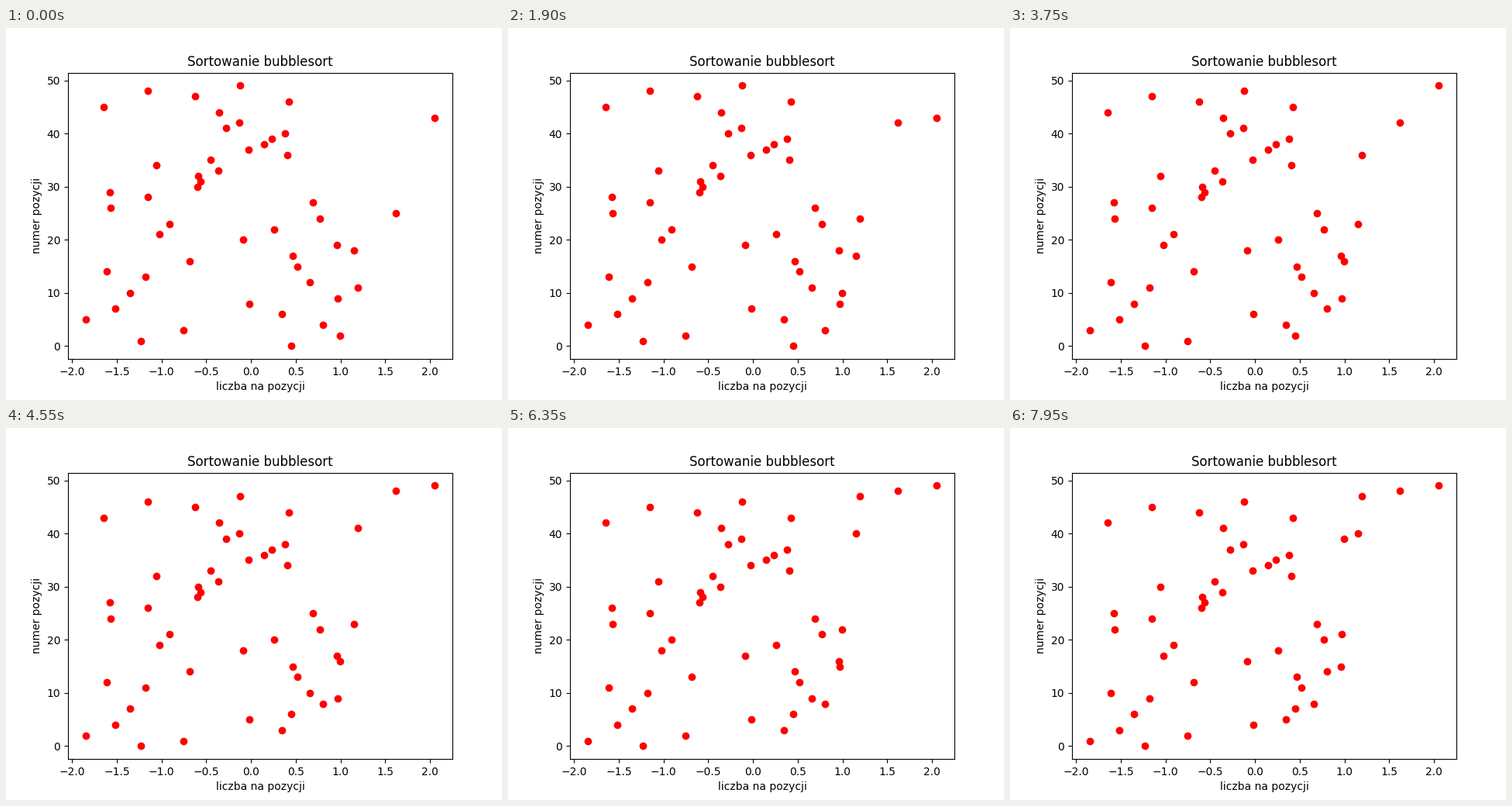
Recreate the animation shown at these times as a matplotlib script. Size 640 by 480 pixels, loop 8000 ms.

```python
import matplotlib.pyplot as plt
import numpy as np
from matplotlib.animation import FuncAnimation

FRAMES = 160
START = 2              # the first pass is already under way at this position
ZERO, UNIT = 316.1, 115.5  # stage x of value 0 and pixels per unit

# Stage x of the number held at each position
STAGE_X = [
    368, 174, 431, 229, 409, 103, 356, 141, 314, 428,
    160, 454, 392, 180, 130, 376, 237, 370, 449, 427,
    306, 198, 346, 211, 405, 503, 135, 396, 183, 134,
    247, 251, 248, 274, 194, 264, 363, 313, 333, 343,
    360, 284, 301, 553, 275, 126, 365, 244, 183, 302,
]


def to_value(px):
    return (np.asarray(px) - ZERO) / UNIT


def bubble_states(numbers, start, count):
    """Return the list after each swap, beginning with the list itself."""
    nums = list(numbers)
    states = [nums[:]]
    j = start
    while len(states) < count:
        if nums[j] > nums[j + 1]:
            nums[j], nums[j + 1] = nums[j + 1], nums[j]
            states.append(nums[:])
        j = (j + 1) % (len(nums) - 1)
    return states


states = bubble_states(to_value(STAGE_X), START, FRAMES)
positions = np.arange(len(STAGE_X))

fig, ax = plt.subplots(figsize=(6.4, 4.8), dpi=100)
dots, = ax.plot(states[0], positions, "ro")
ax.set_xlim(to_value([80, 576]))
ax.set_ylim(-2.45, 51.45)
ax.set_title("Sortowanie bubblesort")
ax.set_xlabel("liczba na pozycji")
ax.set_ylabel("numer pozycji")


def update(frame):
    dots.set_xdata(states[frame])
    return dots,


anim = FuncAnimation(fig, update, frames=FRAMES, interval=50, repeat=True)
plt.show()
```
